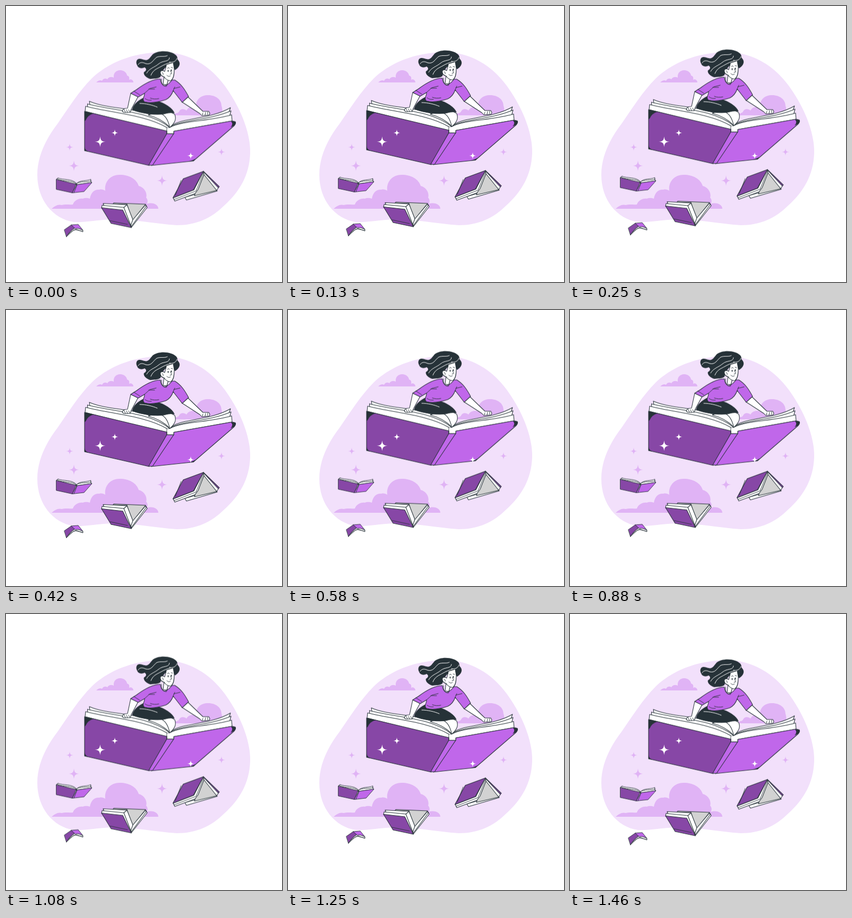
Recreate the animation shown at these times as an HTML page. Size 520 by 520 pixels, loop 1.5 s.

```html
<!DOCTYPE html>
<html lang="en">
<head>
<meta charset="utf-8">
<title>Flying books</title>
<style>
  html, body { margin: 0; width: 100%; height: 100%; overflow: hidden; background: #fff; }
  svg { display: block; width: 100vw; height: 100vh; }
  .float { animation: float 1.5s -20ms linear infinite; }
  @keyframes float { 50% { transform: translateY(-10.4px); } }
  .ink { stroke: #263238; stroke-width: 1.05; stroke-linecap: round; stroke-linejoin: round; }
  .thin { stroke-width: .9; }
  .line { fill: none; }
  .white { fill: #fff; }
  .light { fill: #c067ea; }
  .deep { fill: #8747a6; }
  .grey { fill: #d2d2d2; }
  .dark { fill: #263238; }
  .cloud { fill: #e0b3f5; }
  .strand { fill: none; stroke: #fff; stroke-width: 1; stroke-linecap: round; }
</style>
</head>
<body>
<svg viewBox="0 0 520 520">
  <defs>
    <path id="star" d="M0-10C.8-2.600 2.600-.8 10 0C2.600.8.8 2.600 0 10C-.8 2.600-2.600.8-10 0C-2.600-.8-.8-2.600 0-10Z"/>
  </defs>

  <path fill="#f2e0fb" d="M296 87C344 87 385 113 412 150C443 193 461 240 460 277C459 319 439 351 411 376C387 400 358 413 322 413C285 411 245 402 200 402C170 403 150 408 128 407C88 401 59 365 59 318C59 280 78 247 97 222C117 193 138 160 161 137C193 106 242 87 296 87Z"/>

  <g class="cloud">
    <path d="M170 144C174 140 178 139 181 141C183 136 188 136 191 138C194 133 199 133 203 135C202 126 208 121 215 121C223 121 228 127 228 131C232 132 233 135 232 139C236 137 240 140 240 144Z"/>
    <path d="M315 206C318 200 323 204 326 199C328 193 336 193 340 197C344 190 352 189 358 191C357 176 367 168 381 168C396 168 406 177 406 188C408 194 408 201 406 206Z"/>
    <path d="M86 382C92 377 98 373 105 375C112 373 119 375 126 374C129 366 137 362 145 363C150 361 154 362 158 363C160 350 168 345 176 346C180 345 184 346 187 348C185 332 196 318 214 318C232 318 246 326 250 339C259 341 267 351 264 361C268 365 267 370 265 373C276 369 287 374 287 382Z"/>
    <use href="#star" transform="translate(120 266) scale(.68)"/>
    <use href="#star" transform="translate(128 301)"/>
    <use href="#star" transform="translate(294 329)"/>
    <use href="#star" transform="translate(406 275) scale(.7)"/>
  </g>

  <g class="float">
    <!-- large book -->
    <g class="ink">
      <path class="white" d="M157 180C200 199 270 187 309 229L304 237L159 191Z"/>
      <path class="white" d="M153.500 185C205 199 268 197 308 229L304 237L154 195Z"/>
      <path class="white" d="M150 189.500C205 203 264 206 304 230L304 238L149 199Z"/>
      <path class="white" d="M309 229C322 211 385 215 423 192L418 206L316 234Z"/>
      <path class="white" d="M309 229C328 215 383 216 424 198L421 209L316 235Z"/>
      <path class="white" d="M309 229C332 216 384 218 425 205.500L426 217L316 236.500L316 241L303 241L303 231Z"/>
      <path class="deep" d="M148 199L303 236L303 241L270 301L148 273Z"/>
      <path class="light" d="M316 236.500L426 217L432 218.500Q434 221 430 226L353 292.500L273 301L316 241Z"/>
      <path class="light" d="M303 241L316 241L276 300.500L269 300Z"/>
    </g>
    <path class="white" d="M303.600 230L316 231L316 241L303.600 241Z"/>
    <path class="ink line" d="M303 236L303 241H316V236.500"/>
    <g class="dark">
      <path d="M148 199L165 203Q154 206 150 216L148 217Z"/>
      <path d="M148 266Q149 272 155 275L148 273Z"/>
      <path d="M424 218L432 218Q434 221 430 226L423 229Q429 223 424 218Z"/>
      <path d="M345 293Q352 291 358 288L353 292.500Z"/>
    </g>

    <!-- rider -->
    <g class="ink">
      <path class="white" d="M268 206C283 200 312 198 318 205C321 213 319 220 309 229C300 220 288 211 268 206Z"/>
      <path class="line" d="M293 204C300 207 305 215 308 227"/>
      <path class="dark" d="M259 174C249 179 240 187 238 196C255 203 280 206 297 204C304 202 312 201 317 202C313 193 298 183 285 180Z"/>
      <path class="white" d="M235 165L229 193Q220 193 219 199L222 201L234 201L236 195L249 171Z"/>
      <path class="line thin" d="M223 196L225 201M227 196L229 201M231 196L233 200"/>
      <path class="white" d="M331 181L365 203L369 207L382 206Q386 204 382 199L371 199L343 172Z"/>
      <path class="line thin" d="M371 202L370 206M376 201L375 206M380 200L380 205"/>
      <path class="white" d="M298 131L296 148L303 149L306 138Z"/>
      <path class="light" d="M291 138C273 138 254 152 246 158L235 165L249 172L261 165C262 171 255 176 261 181C275 185 292 180 301 177C309 173 313 166 315 160L332 182L344 171C337 158 330 147 318 140L313 140C309 145 304 150 298 151C293 148 291 143 291 138Z"/>
      <path class="line thin" d="M293 138C292 146 295 151 302 152L304 148M261 165L271 156L283 153M269 157L280 157M315 160L318 153M262 175Q267 179 274 178M272 174Q279 177 288 175M316 156L328 153M241 161L252 168"/>
    </g>
    <path class="strand" d="M252 184C263 184 276 187 285 191"/>

    <path class="dark" d="M247 102C251 98 256 101 261 102C268 104 271 98 276 92C284 85 300 84 311 88C320 91 324 96 323 101C330 107 328 115 319 121L303 114C297 119 293 125 291 134C286 138 278 137 272 138C264 136 258 129 260 125C264 123 266 119 261 116C256 119 249 118 247 112C245 108 245 105 247 102Z"/>
    <path class="ink white" d="M302 111L315 107L317 119C317 130 316 137 311 141C306 142 300 138 298 134C292 133 290 128 291 124C293 121 297 122 299 124C300 119 302 116 302 111Z"/>
    <path class="dark" d="M289 121C295 119 301 118 303 110L316 107L322 108L322 95L296 92L282 112Z"/>
    <g class="strand">
      <path d="M249 111C252 106 257 106 263 109C274 112 277 102 284 97C291 94 299 97 304 94"/>
      <path d="M265 127C270 118 280 116 287 110C296 102 307 107 308 98"/>
      <path d="M273 131C277 121 284 119 291 115C298 111 303 109 310 107"/>
      <path d="M308 106C315 108 321 104 322 99"/>
    </g>
    <g class="ink thin line">
      <path d="M304 118Q306 115 308 118M311 116L314 117M310 122L312 128L309 129M303 131Q306 135 310 132M294 126Q297 126 296 130"/>
      <path stroke-width="1.8" d="M305.500 122V123.500M311.500 121V122.500"/>
    </g>

    <!-- left open book -->
    <g class="ink thin">
      <path class="white" d="M98 324.500C108 329 124 325 133 335L133 338L96 329Z"/>
      <path class="white" d="M96 326C108 332 124 328 133 336L133 337L95 328Z"/>
      <path class="white" d="M133 335C139 328 151 331 160 327L159 331L162 333L133 337Z"/>
      <path class="line" d="M133 335C140 330 152 333 161 330"/>
      <path class="deep" d="M95 327.500L132 336L125 352.500L95 346Z"/>
      <path class="light" d="M134 337L162 333L147 350L125 352.500Z"/>
      <path class="line" d="M132 336L134 337L128 352"/>
    </g>

    <!-- smallest book -->
    <g class="ink thin">
      <path class="white" d="M114 435L127 423L132 421L145 426L145 423L131 417L115 431Z"/>
      <path class="deep" d="M110 422L123 413L131 418Q120 424 114 435Z"/>
      <path class="light" d="M123 413L136 412L145 423Q137 418 131 420Z"/>
      <path class="line" d="M115 433Q123 424 131 422L144 425"/>
    </g>

    <!-- lower book -->
    <g class="ink">
      <path class="white" d="M264 376L266 380L236 418L235 408Z"/>
      <path class="grey" d="M201 374L203 371.500L263 374L237 406L228 374Z"/>
      <path class="white" d="M263 375L264 378L236 416L234 409Z"/>
      <path class="white" d="M183 372.500L228 375L239 403L235 414L186 381Z"/>
      <path class="white" d="M181 376L222 380L236 416L231 415L180 381Z"/>
      <path class="line" d="M228 375L222 380"/>
      <path class="deep" d="M180 380.500L220 385L236 418L198 410Z"/>
      <path class="line thin" d="M196 405L229 412"/>
    </g>

    <!-- right tent book -->
    <g class="ink">
      <path class="white" d="M337 361L340 366L398 349L396 344Z"/>
      <path class="deep" d="M372 312L402 341L400 343L371 317Z"/>
      <path class="white" d="M372 313L400 343L397 348L371 319Z"/>
      <path class="grey" d="M373 318L397 348L355 358L358 348Z"/>
      <path class="white" d="M315 362L318 368L356 354L362 346L373 318L372 312L354 347Z"/>
      <path class="line thin" d="M317 365L358 349L372 315"/>
      <path class="deep" d="M334 326L372 312L353 347L314.500 362Z"/>
      <path class="line thin" d="M330 329L319 357"/>
    </g>
  </g>

  <g class="white">
    <use href="#star" transform="translate(177.400 255.700)"/>
    <use href="#star" transform="translate(205 239) scale(.64)"/>
    <use href="#star" transform="translate(348 282) scale(.66)"/>
  </g>
</svg>
</body>
</html>
```
